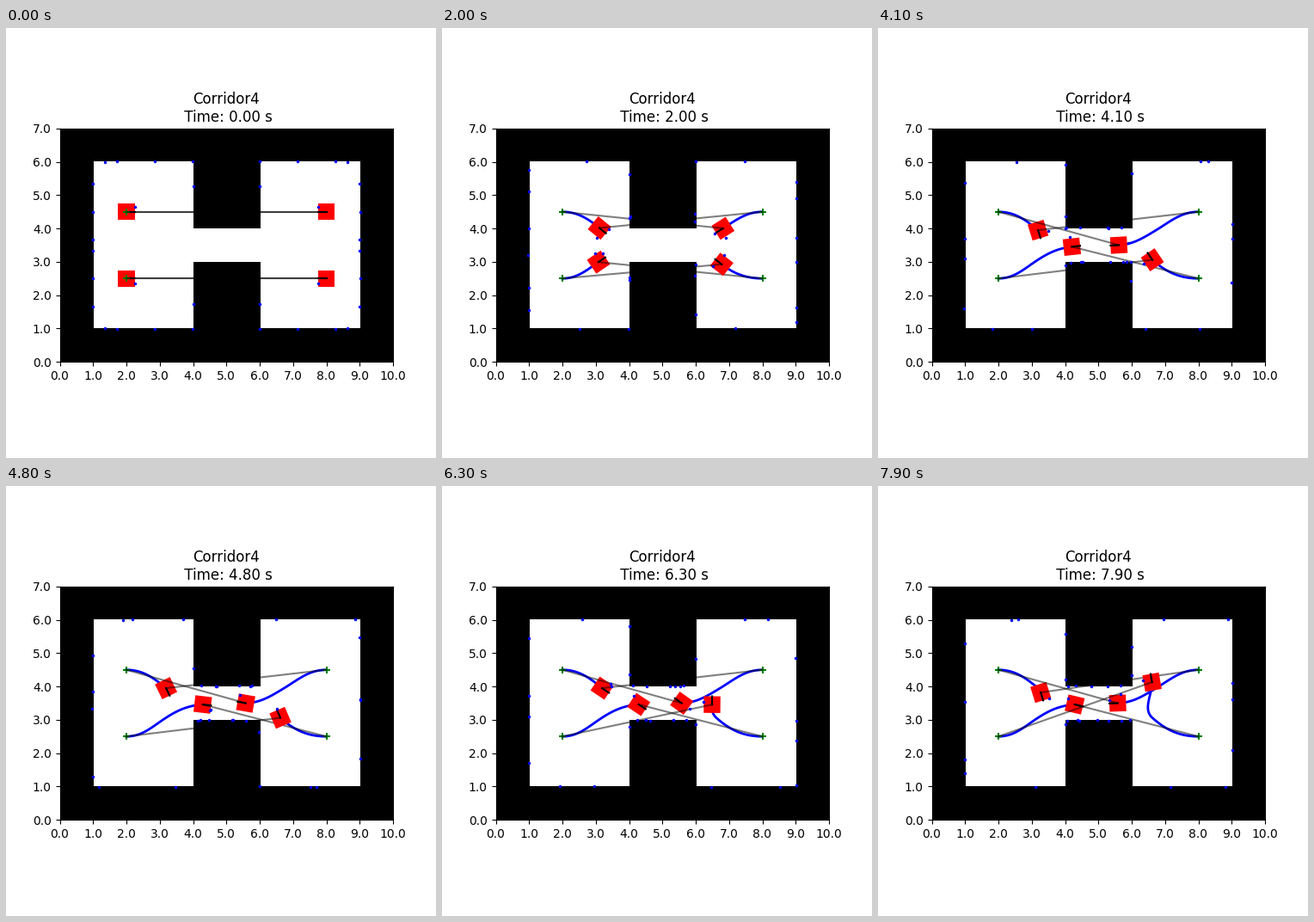
Recreate the animation shown at these times as a matplotlib script. Size 500 by 500 pixels, loop 8 s.

```python
import numpy as np
import matplotlib.pyplot as plt
from matplotlib.animation import FuncAnimation
from matplotlib.patches import Polygon

FRAMES, STEP_MS = 80, 100
TIMES = np.arange(FRAMES) * STEP_MS / 1000
HALF, HIT_RADIUS = 0.25, 0.3
SQUARE = HALF * np.array([(-1, -1), (1, -1), (1, 1), (-1, 1)])
RAYS = 180 + 39.85 * np.arange(-4, 5)
REACH = np.arange(0.02, 10, 0.03)

# Two rooms joined by a corridor, one cell per unit.
free = np.zeros((7, 10), bool)
free[1:6, 1:4] = free[1:6, 6:9] = free[3, 4:6] = True


def direction(degrees):
    a = np.radians(degrees)
    return np.array([np.cos(a), np.sin(a)])


def curve(a, b, s):
    """Cubic Bezier between two (x, y, heading) poses: points and headings."""
    p, q = np.array(a[:2]), np.array(b[:2])
    grip = 0.37 * np.hypot(*(q - p))
    c, d = p + grip * direction(a[2]), q - grip * direction(b[2])
    s = s[:, None]
    r = 1 - s
    points = r**3 * p + 3 * r * r * s * c + 3 * r * s * s * d + s**3 * q
    dx, dy = (r * r * (c - p) + 2 * r * s * (d - c) + s * s * (q - d)).T
    return points, np.degrees(np.arctan2(dy, dx))


def drive(start, legs, parked, mean, swing, peak, period):
    """Follow legs of (begin, end, pose); sway on the spot once parked."""
    xy, heading = np.empty((FRAMES, 2)), np.empty(FRAMES)
    pose = start
    for begin, end, goal in legs:
        on = TIMES >= begin
        s = np.clip((TIMES[on] - begin) / (end - begin), 0, 1)
        xy[on], heading[on] = curve(pose, goal, s)
        pose = goal
    sway = mean + swing * np.cos(2 * np.pi * (TIMES - peak) / period)
    s = np.clip((TIMES - parked) / 0.6, 0, 1)
    heading += s * s * (3 - 2 * s) * ((sway - heading + 180) % 360 - 180)
    return np.column_stack([xy, heading])


ROBOTS = [
    drive((2, 4.5, 0), [(0, 2.15, (3.19, 3.95, -40)),
                        (6.3, 7.9, (3.27, 3.82, -60))],
          parked=2.15, mean=-53, swing=20, peak=6.1, period=3.8),
    drive((2, 2.5, 0), [(0, 2.05, (3.11, 3.01, 34)),
                        (2.6, 4.2, (4.29, 3.46, 4))],
          parked=4.2, mean=-14, swing=-20, peak=6.5, period=5.5),
    drive((8, 4.5, 180), [(0, 2.2, (6.7, 3.93, 211)),
                          (2.2, 4.15, (5.58, 3.5, 182))],
          parked=4.15, mean=162, swing=-20, peak=6, period=3.8),
    drive((8, 2.5, 180), [(0, 2.3, (6.62, 3.06, 138)),
                          (5.15, 7.9, (6.61, 4.13, 90))],
          parked=2.3, mean=108, swing=-20, peak=6.7, period=6.5),
]
GOALS = [(8, 4.5), (8, 2.5), (2, 4.5), (2, 2.5)]


def scan(i):
    """Points where the range sensors of all robots meet a wall or a robot."""
    found = []
    for robot in ROBOTS:
        x0, y0, heading = robot[i]
        dx, dy = direction(heading + RAYS)[:, :, None]
        x, y = x0 + REACH * dx, y0 + REACH * dy
        hit = ~free[np.clip(y, 0, 6).astype(int), np.clip(x, 0, 9).astype(int)]
        for other in ROBOTS:
            if other is not robot:
                hit |= np.hypot(x - other[i, 0], y - other[i, 1]) < HIT_RADIUS
        row, first = np.arange(len(RAYS)), hit.argmax(axis=1)
        found.append([x[row, first], y[row, first]])
    return np.concatenate(found, axis=1)


fig, ax = plt.subplots(figsize=(5, 5), dpi=100)
ax.imshow(free, cmap="gray", origin="lower", extent=(0, 10, 0, 7),
          interpolation="nearest")
ax.set_xticks(range(11))
ax.set_yticks(range(8))
ax.xaxis.set_major_formatter("{x:.1f}")
ax.yaxis.set_major_formatter("{x:.1f}")
ax.set_autoscale_on(False)
title = ax.set_title("")

trails, bodies, noses, links = [], [], [], []
for n, goal in enumerate(GOALS):
    z = 2 + n
    trails += ax.plot([], [], "b-", lw=2, zorder=1.5)
    ax.plot(*goal, "g+", ms=6, mew=1.5, zorder=z)
    bodies.append(ax.add_patch(Polygon(SQUARE, fc="red", lw=0, zorder=z + 0.2)))
    noses += ax.plot([], [], "k-", lw=1.5, zorder=z + 0.4)
    links += ax.plot([], [], "k-", lw=1.5, alpha=0.5, zorder=z + 0.6)
dots, = ax.plot([], [], "bo", ms=2.5, mew=0, zorder=10)


def update(i):
    title.set_text(f"Corridor4\n Time: {TIMES[i]:.2f} s")
    for n, robot in enumerate(ROBOTS):
        x, y, heading = robot[i]
        c, s = direction(heading)
        trails[n].set_data(robot[:i + 1, 0], robot[:i + 1, 1])
        bodies[n].set_xy(SQUARE @ np.array([(c, s), (-s, c)]) + (x, y))
        noses[n].set_data([x, x + HALF * c], [y, y + HALF * s])
        links[n].set_data([x, GOALS[n][0]], [y, GOALS[n][1]])
    dots.set_data(*scan(i))
    return [title, dots, *trails, *bodies, *noses, *links]


anim = FuncAnimation(fig, update, frames=FRAMES, interval=STEP_MS,
                     repeat=True, repeat_delay=0, blit=False)
plt.show()
```
